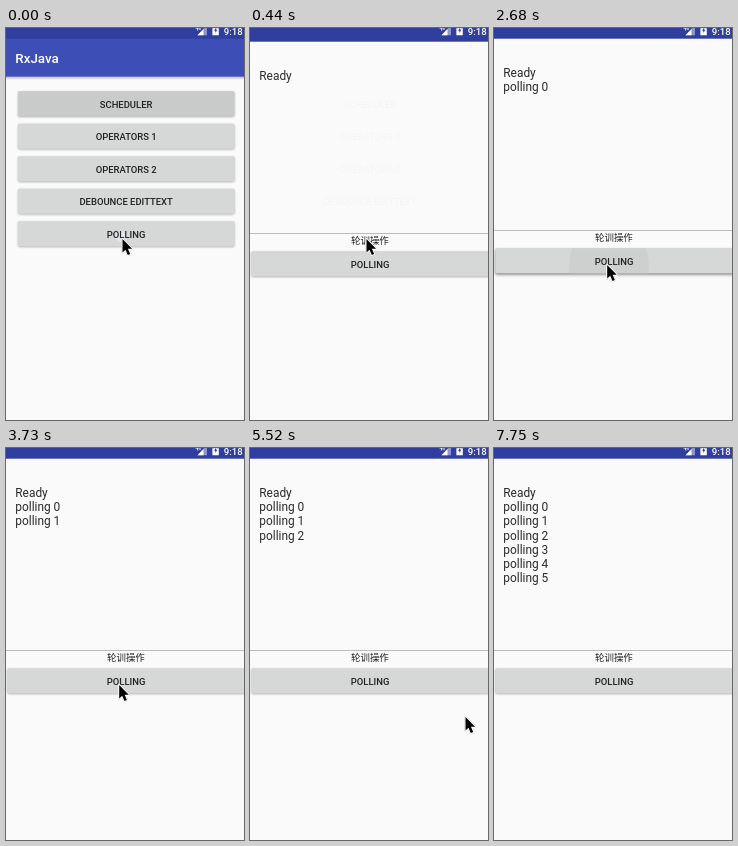
Recreate the animation shown at these times as an HTML page. Size 238 by 392 pixels, loop 8000 ms.

```html
<!DOCTYPE html>
<html lang="en">
<head>
<meta charset="utf-8">
<title>Polling demo</title>
<style>
  html, body { margin: 0; width: 100%; height: 100%; overflow: hidden; background: #fafafa; }
  svg { display: block; width: 238px; height: 392px; }
  text { font-family: Roboto, "Noto Sans CJK SC", "Noto Sans CJK", sans-serif; fill: #212121; }
  .label { font-size: 9.45px; font-weight: 500; text-anchor: middle; }
  .log { font-size: 11.9px; fill: #2a2a2a; }
  .cjk { font-family: "Noto Sans CJK SC", "Noto Sans CJK", sans-serif; font-size: 9.45px; text-anchor: middle; }
  .ghost { fill: #f5f5f5; }
  #cursor { filter: drop-shadow(.3px .9px .7px rgba(0, 0, 0, .4)); }
</style>
</head>
<body>
<svg id="stage" viewBox="0 0 238 392">
  <defs>
    <linearGradient id="drop" x1="0" y1="0" x2="0" y2="1">
      <stop offset="0" stop-color="#000" stop-opacity=".26"/>
      <stop offset="1" stop-color="#000" stop-opacity="0"/>
    </linearGradient>
    <filter id="low" x="-5%" y="-30%" width="110%" height="170%"><feGaussianBlur stdDeviation=".8"/></filter>
    <filter id="high" x="-5%" y="-30%" width="110%" height="180%"><feGaussianBlur stdDeviation="1.6"/></filter>
    <clipPath id="menuClip"><rect x="12" y="193.3" width="216.4" height="25" rx="1.4"/></clipPath>
    <clipPath id="pollClip"><rect x="1.4" y="220.3" width="238" height="25" rx="1.4"/></clipPath>
  </defs>
  <rect width="238" height="392" fill="#fafafa"/>
  <g id="menu">
    <rect y="48.5" width="238" height="3.5" fill="url(#drop)"/>
    <rect y="10" width="238" height="38.7" fill="#3d4eb7"/>
    <text x="9.3" y="35" style="font-size:13.4px;font-weight:500;fill:#fff">RxJava</text>
  </g>
  <g id="page"></g>
  <rect id="bar" width="238" height="10.7" fill="#303f9f"/>
  <g fill="#fff">
    <path d="M201 -3V7.3H191.5Z" opacity=".45"/>
    <path d="M197.5 1V7.3H191.5Z"/>
    <path d="M189.5 0H192.5M191.7 -1V2.5M194 0V2" stroke="#fff" fill="none"/>
    <path d="M206.4 .3H208.2V-1H211V.3H212.8V7.3H206.4Z"/>
    <path d="M210.2 -.6L208 2.8H209.3V5L211.4 1.8H210.2Z" fill="#303f9f"/>
    <text x="217.8" y="6.9" style="font-size:9.6px;font-weight:500;fill:#fff">9:18</text>
  </g>
  <path id="cursor" d="M.5 1V14.5L3.5 11.7L5.8 17L8.2 16L5.9 10.8H10.1Z"
        fill="#000" stroke="#fff" stroke-width="2.2" paint-order="stroke" stroke-linejoin="round"/>
</svg>
<script>
const LOOP = 8000;
const $ = id => document.getElementById(id);

function add(parent, tag, attrs, text) {
  const el = document.createElementNS("http://www.w3.org/2000/svg", tag);
  for (const k in attrs) el.setAttribute(k, attrs[k]);
  if (text) el.textContent = text;
  return parent.appendChild(el);
}

function button(parent, x, mid, w, label, clip) {
  const box = { x, y: mid - 12.7, width: w, height: 25, rx: 1.4 };
  const high = add(parent, "rect", { ...box, y: mid - 10.7, fill: "#000", opacity: .26, filter: "url(#high)" });
  add(parent, "rect", { ...box, y: mid - 12, fill: "#000", opacity: .3, filter: "url(#low)" });
  const face = add(parent, "rect", { ...box, fill: "#d6d7d7" });
  const ripple = clip && add(add(parent, "g", { "clip-path": `url(#${clip})` }), "circle", { fill: "#c8c9c9" });
  add(parent, "text", { class: "label", x: 120.1, y: mid + 3.7 }, label);
  return { high, face, ripple };
}

function setRipple(el, [x, y, r, fill]) {
  el.setAttribute("cx", x);
  el.setAttribute("cy", y);
  el.setAttribute("r", r);
  el.setAttribute("fill", fill || "#c8c9c9");
}

const show = (el, on) => el.setAttribute("visibility", on ? "inherit" : "hidden");

// Value of the last step that has started: rows of [start, value]
const at = (steps, t) => steps.reduce((v, s) => t >= s[0] ? s[1] : v, null);

const labels = ["SCHEDULER", "OPERATORS 1", "OPERATORS 2", "DEBOUNCE EDITTEXT", "POLLING"];
const menuButtons = labels.map((s, i) => button($("menu"), 12, 76 + 32.5 * i, 216.4, s, i === 4 && "menuClip"));
const scheduler = menuButtons[0], opener = menuButtons[4];
menuButtons.forEach(b => show(b.high, false));

const page = $("page");
const ghosts = add(page, "g", { transform: "translate(0 -3)" });
labels.slice(0, 4).forEach((s, i) =>
  add(ghosts, "text", { class: "label ghost", x: 120.1, y: 79.7 + 32.5 * i }, s));
add(page, "rect", { y: 202, width: 238, height: 1, fill: "#bcbcbc" });
add(page, "text", { class: "cjk", x: 119.9, y: 213.4 }, "轮训操作");
const poll = button(page, 1.4, 233, 238, "POLLING", "pollClip");

const logTimes = [0, 2680, 3730, 4770, 5670, 6710, 7750];
const lines = logTimes.map((_, i) =>
  add(page, "text", { class: "log", x: 9.3, y: 49 + 14.17 * i }, i ? "polling " + (i - 1) : "Ready"));

const cursorSteps = [
  [0, [116, 210]], [1180, [115, 230]], [1330, [112.7, 236]], [5070, [118, 256]],
  [5220, [190, 268]], [5520, [215, 268]], [5670, [215.5, 269]], [5970, [205, 279]],
  [6120, [200, 287]], [6270, [197, 297]], [6410, null]
];
const menuRipple = [[0, [115, 208.5, 5.5, "#e4e4ee"]], [300, [118.5, 209, 28]]];
const pollRipple = [[0, [0, 0, 0]], [2530, [115, 237, 8, "#cccdcd"]], [2680, [115, 237, 40, "#cecfcf"]], [2830, [0, 0, 0]]];

function draw(t) {
  const opened = t >= 440, sliding = opened && t < 590;
  show($("menu"), !opened);
  show(page, opened);
  show(ghosts, sliding);
  page.setAttribute("transform", `translate(0 ${sliding ? 3 : 0})`);
  $("bar").setAttribute("height", sliding ? 13.7 : 10.7);

  scheduler.face.setAttribute("fill", t < 150 ? "#c9caca" : "#d6d7d7");
  show(opener.high, !opened && t >= 150);
  setRipple(opener.ripple, at(menuRipple, t));
  show(poll.high, t >= 2680 && t < 2830);
  setRipple(poll.ripple, at(pollRipple, t));
  lines.forEach((el, i) => show(el, t >= logTimes[i]));

  const tip = at(cursorSteps, t);
  show($("cursor"), tip);
  if (tip) $("cursor").setAttribute("transform", `translate(${tip})`);
}

const start = performance.now();
function tick() {
  draw((performance.now() - start) % LOOP);
  requestAnimationFrame(tick);
}
tick();
</script>
</body>
</html>
```
